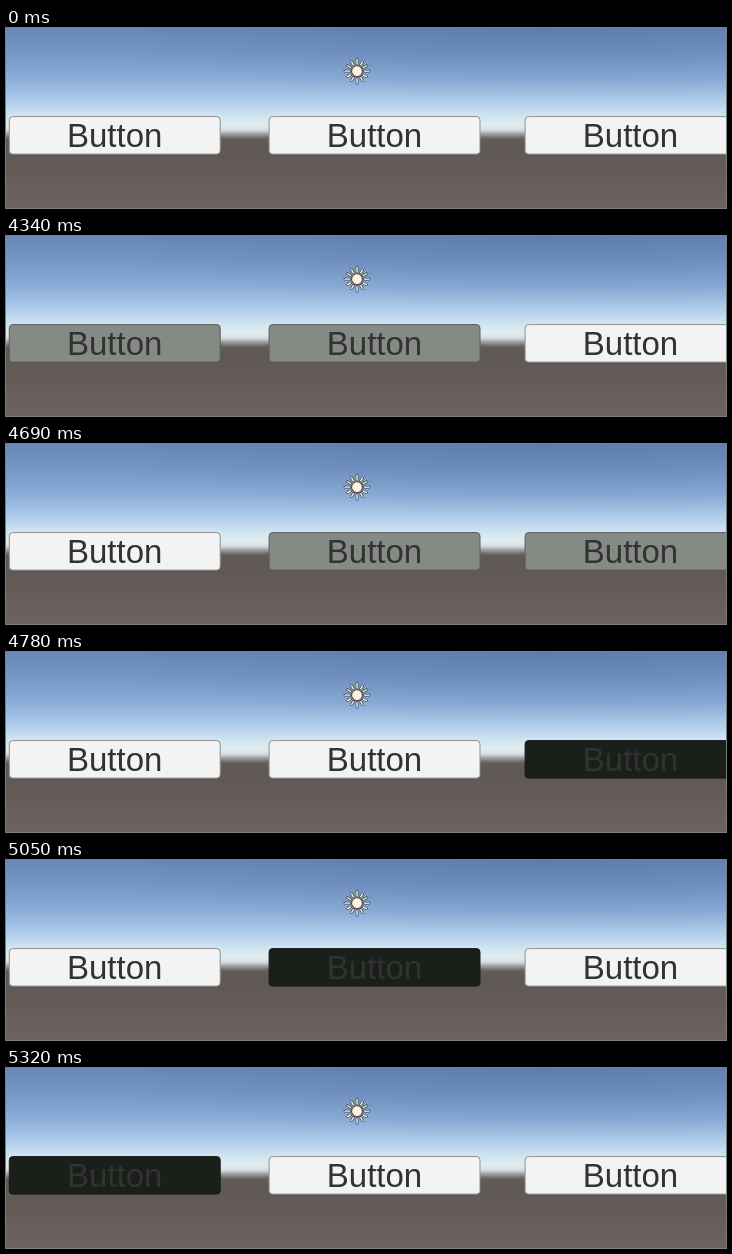
An HTML page that plays this animation: 720 by 180 pixels, repeating every 8170 ms.

```html
<!DOCTYPE html>
<html>
<head>
<meta charset="utf-8">
<style>
html, body { margin: 0; width: 100%; height: 100%; overflow: hidden; }
body {
  background:
    radial-gradient(ellipse 460px 75px at 540px 0, rgba(65,95,145,.28), rgba(65,95,145,0)),
    linear-gradient(#6888ba 0, #7696c7 25px, #8badd8 50px, #a9c9e8 70px, #cce2f1 86px,
      #e1eef1 97px, #d5dfe0 102px, #8f9291 107px, #625d5a 111px, #5e5753 116px, #655c58 145px, #6c615f 180px);
}
svg { display: block; }
text { font: 33px "Liberation Sans", Arial, sans-serif; fill: #323232; text-anchor: middle; }
</style>
</head>
<body>
<svg id="stage" width="720" height="180" viewBox="0 0 720 180"></svg>
<script>
const stage = document.getElementById("stage");
const LOOP = 8170;
// Face and border for released, half pressed and pressed
const LOOKS = [["#f3f3f3", "#8b9092"], ["#868a85", "#595d58"], ["#1a1f19", "#161b15"]];
// Start time and the look of each button
const STEPS = [
  [0, "000"], [3530, "200"], [4340, "110"], [4430, "020"], [4690, "011"],
  [4780, "002"], [4960, "011"], [5050, "020"], [5230, "110"], [5320, "200"]
];

function add(tag, attrs) {
  const el = document.createElementNS("http://www.w3.org/2000/svg", tag);
  for (const key in attrs) el.setAttribute(key, attrs[key]);
  stage.append(el);
  return el;
}

function drawSun(x, y) {
  let rays = "";
  for (let i = 0; i < 12; i++) {
    const a = i * Math.PI / 6, end = i % 3 ? 10.8 : 12;
    const point = r => `${x + r * Math.cos(a)} ${y + r * Math.sin(a)}`;
    rays += `M${point(7.3)}L${point(end)}`;
  }
  add("path", { d: rays, stroke: "#43484d", "stroke-width": 2.8, "stroke-linecap": "round" });
  add("path", { d: rays, stroke: "#fffaf0", "stroke-width": 1.3, "stroke-linecap": "round" });
  add("circle", { cx: x, cy: y, r: 5.4, fill: "#fff2df", stroke: "#4a4c4d", "stroke-width": 1.1 });
}

drawSun(351, 43.2);
const faces = [3, 262.8, 518.8].map(x => {
  const face = add("rect", { x: x + .3, y: 88.6, width: 210.9, height: 37.5, rx: 3.5 });
  add("text", { x: x + 105.7, y: 119 }).textContent = "Button";
  return face;
});

function frame() {
  const t = performance.now() % LOOP;
  const state = STEPS.filter(s => s[0] <= t).pop()[1];
  faces.forEach((face, i) => {
    const [fill, stroke] = LOOKS[state[i]];
    face.setAttribute("fill", fill);
    face.setAttribute("stroke", stroke);
  });
  requestAnimationFrame(frame);
}
frame();
</script>
</body>
</html>
```
